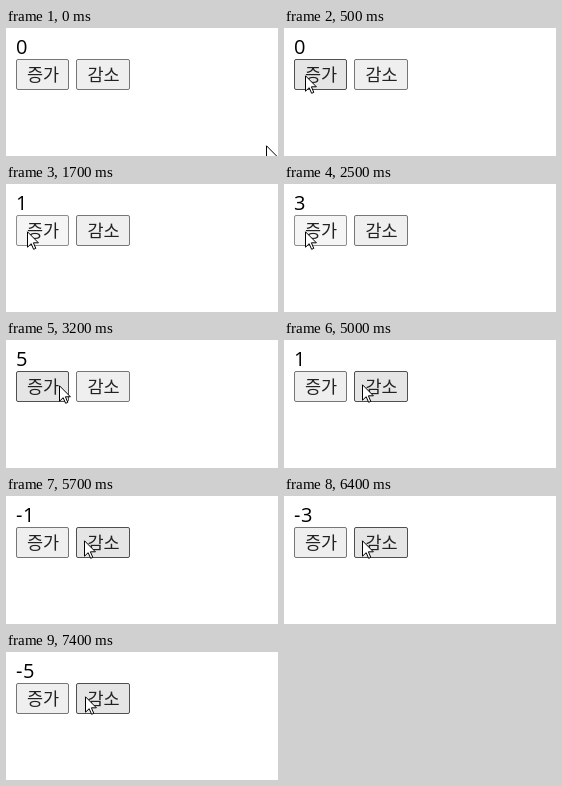
These frames come from a looping animation (272 px wide and 128 px high, 8000 ms). An HTML page:

```html
<!DOCTYPE html>
<html lang="ko">
<head>
<meta charset="utf-8">
<title>Counter</title>
<style>
html, body { margin: 0; width: 100%; height: 100%; overflow: hidden; background: #fff; }
svg { display: block; width: 272px; height: 128px; }
#count { font: 20px "Open Sans", "Noto Sans", sans-serif; letter-spacing: .6px; }
.btn rect { fill: #efefef; stroke: #767676; }
.btn.hover rect { fill: #e5e5e5; stroke: #4f4f4f; }
.btn.active rect { fill: #f5f5f5; stroke: #8d8d8d; }
.btn text { font: 300 17.5px "Noto Sans CJK KR", "Noto Sans CJK", sans-serif; text-anchor: middle; fill: #222; }
#cursor { fill: #fff; stroke: #000; }
</style>
</head>
<body>
<svg viewBox="0 0 272 128">
  <text id="count" x="10" y="26">0</text>
  <g class="btn"><rect x="10.5" y="31.5" width="52" height="30" rx="1.5"/><text x="37" y="53">증가</text></g>
  <g class="btn"><rect x="70.5" y="31.5" width="53" height="30" rx="1.5"/><text x="97.5" y="53">감소</text></g>
  <path id="cursor" d="M.5 .8V16.2L4.2 12.7 6.6 18.3 8.8 17.4 6.4 11.8H11.4Z"/>
</svg>
<script>
const LOOP = 8000, TICK = 100;
const count = document.getElementById('count');
const cursor = document.getElementById('cursor');
const buttons = [...document.querySelectorAll('.btn')];
const edges = [[10, 63], [70, 124]];

// [press, release, change]
const clicks = [
  ...[1300, 1700, 2100, 2500, 2900].map(t => [t, t + 100, 1]),
  [3800, 3900, -1], [4100, 4300, -1],
  ...[4500, 4900, 5200, 5600, 6000, 6300, 6600, 7000].map(t => [t, t + 100, -1])
];

// [start, end, x, y]
const moves = [[0, 500, 21, 47], [3100, 3400, 78, 44], [7300, 7400, 79, 44]];

function pointer(t) {
  let x = 260, y = 117;
  for (const [start, end, toX, toY] of moves) {
    const k = Math.min(1, Math.max(0, (t - start) / (end - start)));
    const e = 1 - (1 - k) ** 2;
    x += (toX - x) * e;
    y += (toY - y) * e;
  }
  return [Math.round(x), Math.round(y)];
}

function draw(now) {
  const t = Math.floor((now % LOOP) / TICK) * TICK;
  const [x, y] = pointer(t);
  const pressed = clicks.some(([down, up]) => t >= down && t < up);
  const value = clicks.reduce((sum, [, up, step]) => t >= up ? sum + step : sum, 0);

  cursor.setAttribute('transform', `translate(${x} ${y})`);
  count.textContent = value;
  buttons.forEach((button, i) => {
    const over = x >= edges[i][0] && x < edges[i][1] && y >= 31 && y < 62;
    button.classList.toggle('hover', over);
    button.classList.toggle('active', over && pressed);
  });
}

const began = performance.now();
function frame() {
  draw(performance.now() - began);
  requestAnimationFrame(frame);
}
frame();
</script>
</body>
</html>
```
